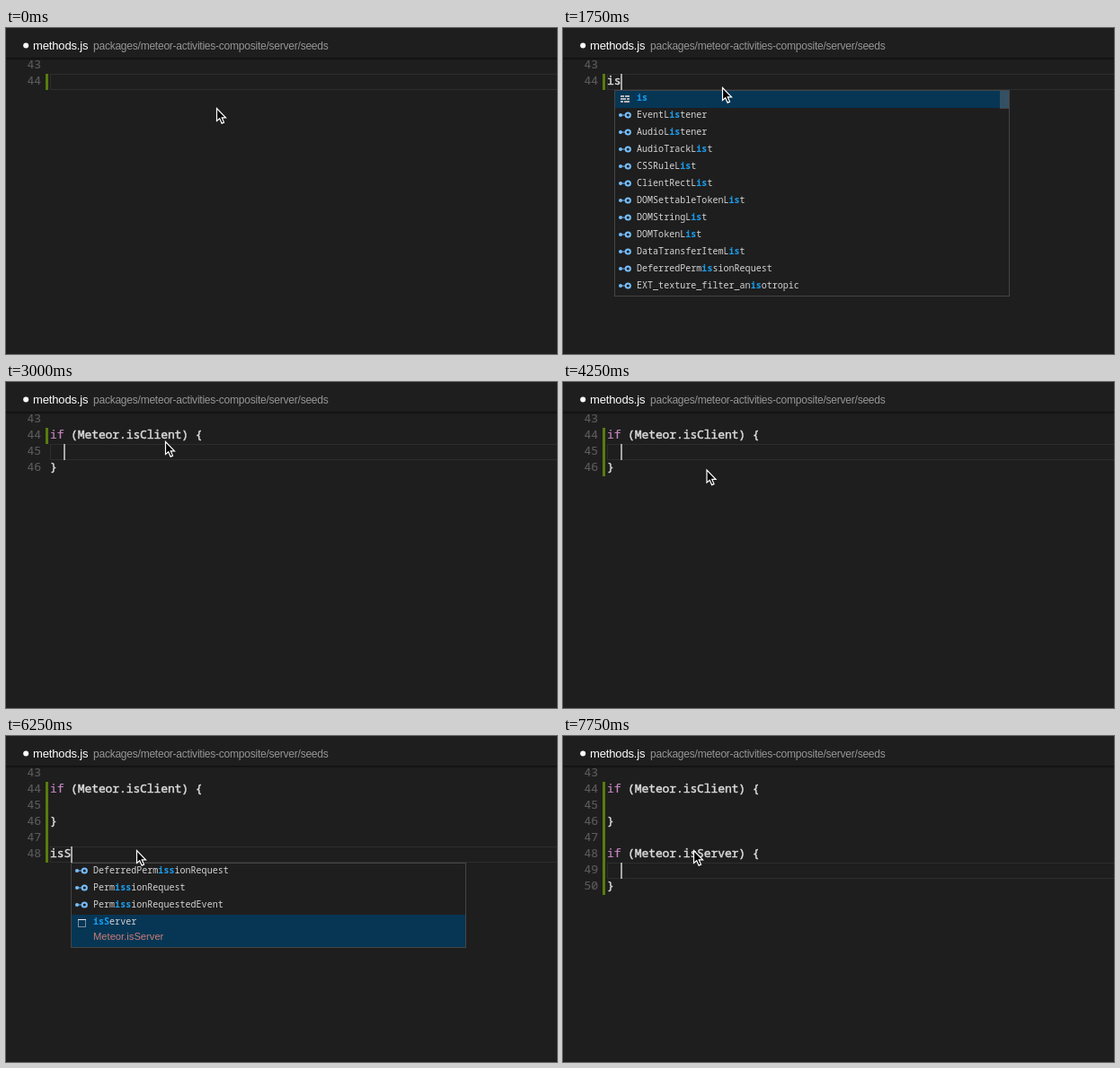
An HTML page with a canvas that plays this animation: 613 by 363 pixels, repeating every 8 s.

```html
<!DOCTYPE html>
<html lang="en">
<head>
<meta charset="utf-8">
<title>Editor snippets</title>
<style>
html, body { margin: 0; width: 100%; height: 100%; overflow: hidden; background: #1e1e1e; }
canvas { display: block; }
</style>
</head>
<body>
<canvas id="stage" width="613" height="363"></canvas>
<script>
const ctx = document.getElementById('stage').getContext('2d');
const LOOP = 8000, TICK = 250;
const FIRST = 44, TOP = 51, ROW = 18, LEFT = 49, CHAR = 7.7, ITEM = 19;
const MONO = '"Noto Sans Mono", "DejaVu Sans Mono", monospace';
const SANS = '"Liberation Sans", Arial, sans-serif';

const LISTS = {
  i: ['if', 'IDBCursor', 'IDBCursorWithValue', 'IDBDatabase', 'IDBFactory', 'IDBIndex', 'IDBKeyRange',
    'IDBObjectStore', 'IDBOpenDBRequest', 'IDBRequest', 'IDBTransaction', 'Image'],
  is: ['is', 'EventListener', 'AudioListener', 'AudioTrackList', 'CSSRuleList', 'ClientRectList',
    'DOMSettableTokenList', 'DOMStringList', 'DOMTokenList', 'DataTransferItemList',
    'DeferredPermissionRequest', 'EXT_texture_filter_anisotropic'],
  isS: ['DeferredPermissionRequest', 'PermissionRequest', 'PermissionRequestedEvent', 'isServer']
};
const DETAILS = { if: 'If Statement', isClient: 'Meteor.isClient', isServer: 'Meteor.isServer' };

const block = name => [`if (Meteor.${name}) {`, '', '}'];
const client = block('isClient');
const both = [...client, '', ...block('isServer')];

// Typing shows a completion list; any other edit closes it.
const type = (word, before = []) => ({
  lines: [...before, word], row: before.length, col: word.length, on: true, word
});
const edit = (lines, row, col) => ({ lines, row, col, on: true, word: '' });
const blink = on => ({ on });
const typeServer = word => type(word, [...client, '']);

const steps = [
  [0, { ...edit([''], 0, 0), on: false, green: 1, mouse: [234.5, 89.5] }],
  [250, { mouse: [198, 74] }],
  [500, { mouse: [177.5, 66.5], on: true }],
  [1000, blink(false)],
  [1500, type('i')],
  [1750, type('is')],
  [2000, type('isC')],
  [2250, type('isCl')],
  [2500, type('isClien')],
  [2750, type('isClient')],
  [3000, edit(client, 1, 2)],
  [3250, { green: 3 }],
  [3500, blink(false)],
  [4000, blink(true)],
  [4250, { mouse: [160, 98] }],
  [4500, { mouse: [145.5, 127.5] }],
  [4750, edit(client, 2, 1)],
  [5000, edit([...client, ''], 3, 0)],
  [5250, { ...edit([...client, '', ''], 4, 0), green: 4 }],
  [5500, { green: 5 }],
  [5750, typeServer('i')],
  [6000, typeServer('is')],
  [6250, typeServer('isS')],
  [6500, typeServer('isSer')],
  [6750, typeServer('isServer')],
  [7000, edit(both, 5, 2)],
  [7250, { green: 7 }],
  [7500, blink(false)],
  [7750, blink(true)]
];

const columnX = col => Math.round(LEFT + col * CHAR);

function rect(x, y, w, h, color) {
  ctx.fillStyle = color;
  ctx.fillRect(x, y, w, h);
}

function frame(x, y, w, h, color) {
  ctx.strokeStyle = color;
  ctx.lineWidth = 1;
  ctx.strokeRect(x + 0.5, y + 0.5, w - 1, h - 1);
}

function disc(x, y, r, color) {
  ctx.fillStyle = color;
  ctx.beginPath();
  ctx.arc(x, y, r, 0, 7);
  ctx.fill();
}

function text(str, x, y, font, color, spacing = 0) {
  ctx.font = font;
  ctx.fillStyle = color;
  ctx.letterSpacing = spacing + 'px';
  ctx.fillText(str, x, y);
}

// A thin outline gives code its medium weight.
function code(str, x, y, color = '#dcdcdc', outline = 0.45) {
  text(str, x, y, `13px ${MONO}`, color, -0.1);
  ctx.strokeStyle = color;
  ctx.lineWidth = outline;
  ctx.strokeText(str, x, y);
}

const lineNumber = (n, y) => code(n, 23.5, y, '#5a5a5a', 0.2);

function drawTitle() {
  disc(22.2, 19.5, 3, '#fff');
  text('methods.js', 30, 24, `13px ${SANS}`, '#fff', -0.15);
  text('packages/meteor-activities-composite/server/seeds', 97, 24, `12px ${SANS}`, '#969696', -0.23);
}

function drawShadow() {
  const fade = ctx.createLinearGradient(0, 33, 0, 36);
  fade.addColorStop(0, 'rgba(0,0,0,.55)');
  fade.addColorStop(1, 'rgba(0,0,0,0)');
  rect(0, 33, 613, 3, fade);
}

function drawEditor({ lines, row, col, on, green }) {
  frame(LEFT, TOP + row * ROW, 600, ROW, '#2d2d2d');
  lineNumber(FIRST - 1, TOP - 6);
  rect(44, TOP, 3, green * ROW, '#587c0c');
  lines.forEach((line, i) => {
    const y = TOP + 12 + i * ROW;
    const keyword = line.startsWith('if ') ? 2 : 0;
    lineNumber(FIRST + i, y);
    code(line.slice(0, keyword), LEFT, y, '#c586c0', 0.2);
    code(line.slice(keyword), LEFT + keyword * CHAR, y);
  });
  if (on) rect(columnX(col) + 0.2, TOP + row * ROW, 1.6, ROW, '#c8c8c8');
}

function drawIcon(name, x, y) {
  if (DETAILS[name]) {
    ctx.setLineDash([1, 1]);
    frame(x + 8, y + 6, 9, 9, '#e8e8e8');
    ctx.setLineDash([]);
    rect(x + 8, y + 6, 9, 1, '#e8e8e8');
  } else if (name === 'is') {
    for (const [dx, dy, w] of [[7, 6, 4], [12, 6, 5], [7, 9, 6], [14, 9, 3], [7, 12, 3], [11, 12, 6]])
      rect(x + dx, y + dy, w, 2, '#b8b8b8');
  } else {
    disc(x + 7, y + 9, 2, '#75beff');
    rect(x + 7, y + 8.5, 6, 1, '#75beff');
    ctx.strokeStyle = '#75beff';
    ctx.lineWidth = 2;
    ctx.beginPath();
    ctx.arc(x + 15.3, y + 9, 2.6, 0, 7);
    ctx.stroke();
  }
}

function drawLabel(name, word, x, y) {
  const at = name.toLowerCase().indexOf(word.toLowerCase());
  const end = at + word.length;
  const part = (from, to, weight, color) =>
    text(name.slice(from, to), x + from * 6.03, y, `${weight} 10px ${MONO}`, color, 0.03);
  part(0, at, 'normal', '#d4d4d4');
  part(at, end, 'bold', '#1a9cec');
  part(end, name.length, 'normal', '#d4d4d4');
}

function drawPopup({ word, row }) {
  const items = LISTS[word] || [word[2] === 'C' ? 'isClient' : 'isServer'];
  const x = columnX(word === 'is' ? 1 : word.length);
  const top = TOP + (row + 1) * ROW;
  const tall = items.some(name => DETAILS[name]) ? 17 : 0;
  const height = items.length * ITEM + tall + (items.length > 1 ? 2 : 1);
  const picked = Math.max(0, items.findIndex(name => DETAILS[name]));
  rect(x, top, 440, height, '#1e1e1e');
  rect(x, top + picked * ITEM + 1, 440, ITEM + tall, '#073655');

  let y = top;
  items.forEach(name => {
    drawIcon(name, x, y);
    drawLabel(name, word, x + 25, y + 12);
    y += ITEM;
    if (DETAILS[name]) {
      text(DETAILS[name], x + 25, y + 10, `11.2px ${SANS}`, '#cd7d74');
      y += tall;
    }
  });
  if (items.length > 4) rect(x + 429, top + 1, 10, 20, 'rgba(121,121,121,.4)');
  frame(x, top, 440, height, '#454545');
}

function drawMouse([x, y]) {
  ctx.beginPath();
  for (const [dx, dy] of [[0, 0], [0, 14], [3.2, 11.2], [5.6, 16.6], [8, 15.6], [5.7, 10.3], [10, 10.3]])
    ctx.lineTo(x + dx, y + dy);
  ctx.closePath();
  ctx.fillStyle = '#000';
  ctx.fill();
  ctx.strokeStyle = '#fff';
  ctx.lineWidth = 1.2;
  ctx.stroke();
}

function draw(now) {
  const t = Math.floor((now % LOOP) / TICK) * TICK;
  const state = Object.assign({}, ...steps.filter(([at]) => at <= t).map(([, change]) => change));
  rect(0, 0, 613, 363, '#1e1e1e');
  drawTitle();
  drawEditor(state);
  drawShadow();
  if (state.word) drawPopup(state);
  drawMouse(state.mouse);
  requestAnimationFrame(draw);
}
requestAnimationFrame(draw);
</script>
</body>
</html>
```
